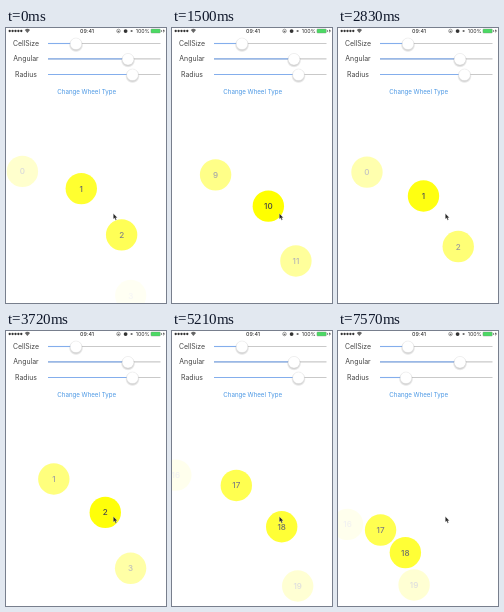
Recreate the animation shown at these times as an HTML page. Size 160 by 275 pixels, loop 8000 ms.

```html
<!DOCTYPE html>
<html lang="en">
<head>
<meta charset="utf-8">
<title>Wheel list</title>
<style>
  html, body { margin: 0; width: 100%; height: 100%; overflow: hidden; background: #fff; }
  svg { display: block; width: 160px; height: 275px; }
  text { font-family: Inter, Roboto, sans-serif; text-anchor: middle; }
  .label { font-size: 6.9px; fill: #444; }
  .link { font-size: 6.15px; fill: #4a97e4; }
  .status { font-size: 5.3px; fill: #333; }
  .cell text { font-size: 8.1px; font-weight: 500; fill: #444; }
  .cell circle { fill: #ff0; }
  .track { stroke: #c9c9c9; stroke-width: 1.1; }
  .fill { stroke: #84aeec; stroke-width: 1.1; }
  .thumb { fill: #fff; stroke: #e0e0e0; stroke-width: .4; }
</style>
</head>
<body>
<svg viewBox="0 0 160 275">
  <defs>
    <radialGradient id="shade">
      <stop offset=".6" stop-color="#000" stop-opacity=".25"/>
      <stop offset="1" stop-color="#000" stop-opacity="0"/>
    </radialGradient>
  </defs>
  <g id="wheel"></g>
  <g id="sliders"></g>
  <text class="link" x="80.7" y="65.5">Change Wheel Type</text>
  <g id="bar" fill="#333">
    <path d="M18.8 1.9Q21.4 -.3 24 1.9L21.4 5Z" fill="#666"/>
    <text class="status" x="81" y="5" font-weight="500">09:41</text>
    <circle cx="112.5" cy="3" r="1.8" fill="none" stroke="#666" stroke-width=".6"/>
    <path d="M111.7 2.7h1.6v1.4h-1.6z" fill="#666"/>
    <circle cx="119.6" cy="3.1" r="1.9"/>
    <circle cx="125.6" cy="3" r="1.1" fill="#666"/>
    <text class="status" x="136.8" y="5">100%</text>
    <rect x="144.9" y=".9" width="9.4" height="4.2" rx=".8" fill="#4cd964" stroke="#777" stroke-width=".3"/>
    <path d="M155 2.2h.7v1.6h-.7z"/>
    <path d="M158.2 .8l-1.5 2.5h1.1l-.5 2 1.6-2.7h-1.1z"/>
  </g>
  <path d="M107.3 185.5v5.6l1.3-1.1 1 2.2 1-.4-.9-2.1h1.7z" fill="#222" stroke="#fff" stroke-width=".3"/>
</svg>
<script>
const LOOP = 8000, START = 900, TICK = 148.2;
const CENTER = { x: 16.4, y: 252.7 }, GAP = 32.6, COUNT = 20;

// Keys are [tick, value]; scroll is in degrees, thumb in pixels
const scrollKeys = [[-1, 0], [0, 8], [4, 279], [8, 345], [12, 20], [13, -6.6],
  [16, 2], [19, 15.9], [24, 176.3], [28, 535], [29, 528.2]];
const thumbKeys = [[34, 126.5], [35, 120], [37, 96], [42, 71], [45, 68]];

function add(parent, tag, attrs, text) {
  const el = document.createElementNS('http://www.w3.org/2000/svg', tag);
  for (const k in attrs) el.setAttribute(k, attrs[k]);
  if (text !== undefined) el.textContent = text;
  return parent.appendChild(el);
}

// Monotone cubic through the keys, held flat outside them
function curve(keys, n) {
  const last = keys.length - 1;
  if (n <= keys[0][0]) return keys[0][1];
  if (n >= keys[last][0]) return keys[last][1];
  const slope = i => (keys[i + 1][1] - keys[i][1]) / (keys[i + 1][0] - keys[i][0]);
  const tangent = i => {
    if (i === 0 || i === last) return 0;
    const a = slope(i - 1), b = slope(i);
    return a * b <= 0 ? 0 : 2 * a * b / (a + b);
  };
  let i = 0;
  while (n > keys[i + 1][0]) i++;
  const [x0, y0] = keys[i], [x1, y1] = keys[i + 1];
  const h = x1 - x0, u = (n - x0) / h, v = 1 - u;
  return y0 * (1 + 2 * u) * v * v + h * tangent(i) * u * v * v
    + y1 * u * u * (3 - 2 * u) - h * tangent(i + 1) * u * u * v;
}

const bar = document.getElementById('bar');
for (let i = 0; i < 5; i++) add(bar, 'circle', { cx: 3.7 + i * 2.9, cy: 3, r: 1.15 });

const sliders = document.getElementById('sliders');
function slider(name, y, x) {
  add(sliders, 'text', { class: 'label', x: 20, y: y + 2.3 }, name);
  add(sliders, 'path', { class: 'track', d: `M42 ${y}H154.5` });
  const fill = add(sliders, 'path', { class: 'fill' });
  const thumb = add(sliders, 'g', {});
  add(thumb, 'circle', { cy: 1.2, r: 7.3, fill: 'url(#shade)' });
  add(thumb, 'circle', { class: 'thumb', r: 5.8 });
  const set = x => {
    fill.setAttribute('d', `M42 ${y}H${x}`);
    thumb.setAttribute('transform', `translate(${x} ${y + .3})`);
  };
  set(x);
  return set;
}
slider('CellSize', 15.5, 70);
slider('Angular', 30.9, 122);
const setRadius = slider('Radius', 46.5, 126.5);

const wheel = document.getElementById('wheel');
const cells = Array.from({ length: COUNT }, (_, i) => {
  const g = add(wheel, 'g', { class: 'cell' });
  add(g, 'circle', { r: 15.7 });
  add(g, 'text', { y: 3 }, i);
  return g;
});

function draw(time) {
  const n = Math.floor((time % LOOP - START) / TICK);
  const scroll = curve(scrollKeys, n), thumb = curve(thumbKeys, n);
  const radius = 59.7 + (thumb - 68) * .848;
  setRadius(thumb);
  cells.forEach((cell, i) => {
    const deg = i * GAP - scroll, a = deg * Math.PI / 180;
    const alpha = Math.max(0, Math.min(1, 1.04 - Math.abs(deg - 45) / 53));
    const x = CENTER.x + radius * Math.sin(a), y = CENTER.y - radius * Math.cos(a);
    cell.setAttribute('opacity', alpha);
    cell.setAttribute('transform', `translate(${x} ${y})`);
  });
}

const begin = performance.now();
function loop() {
  draw(performance.now() - begin);
  requestAnimationFrame(loop);
}
loop();
</script>
</body>
</html>
```
